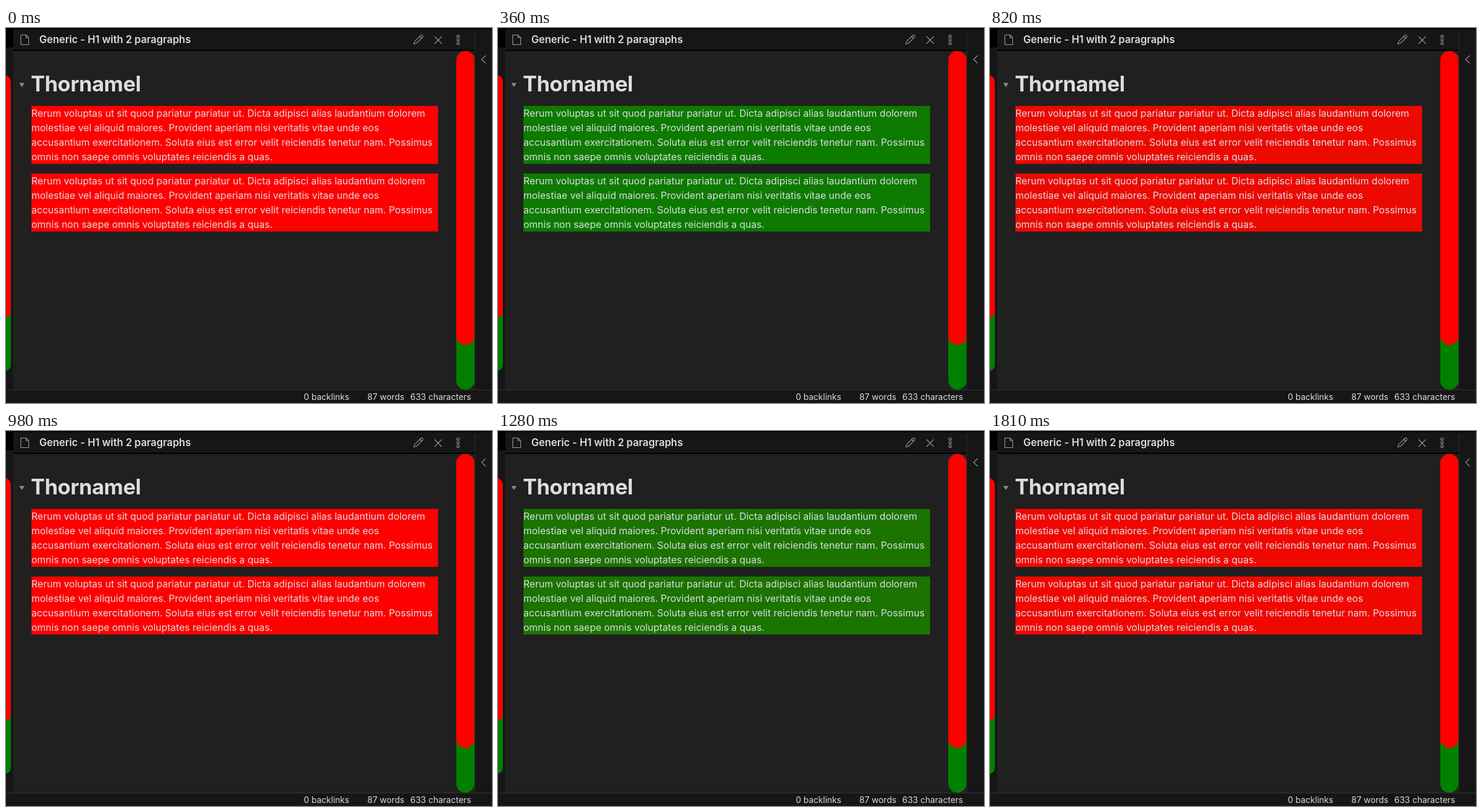
Animation of 803x621 px, one loop 2030 ms. Source, as an HTML page:

```html
<!DOCTYPE html>
<html lang="en">
<head>
<meta charset="utf-8">
<style>
  html, body { margin: 0; width: 100%; height: 100%; overflow: hidden; background: #000; }
  svg { display: block; }
  text { font-family: Inter, sans-serif; font-optical-sizing: none; fill: #dcddde; }
  .body { font-size: 16px; }
  .status { font-size: 14px; fill: #999; }
  .icon { fill: none; stroke: #999; stroke-width: 1.1; }
</style>
</head>
<body>
<svg width="803" height="621" viewBox="0 0 803 621">
  <path d="M0 32H12V599H0Z" fill="#161616"/>
  <path d="M12 36V6a4 4 0 0 1 4-4H770a4 4 0 0 1 4 4V36Z" fill="#161616"/>
  <path d="M12 38H774V599H12Z" fill="#202020"/>
  <path d="M775 2H803V599H775Z" fill="#161616"/>
  <path d="M774 2H775V599H774Z" fill="#2a2a2a"/>
  <path d="M0 599H803V621H0Z" fill="#161616"/>
  <path d="M0 599H803V600H0Z" fill="#333"/>

  <path d="M0 440H8V558Q8 564 2 567H0Z" fill="#008000"/>
  <path d="M0 78Q8 81 8 90V468Q8 477 0 480Z" fill="#f00"/>
  <rect x="744" y="38" width="30" height="561" rx="15" fill="#008000"/>
  <rect x="744" y="38" width="30" height="487" rx="15" fill="#f00"/>

  <g class="icon">
    <path d="M24.5 11.5H33L37.5 16V27.5H24.5ZM33 11.5V16H37.5"/>
    <path d="M674 26.5L675.2 22.2L685.6 11.8Q687 11 688.2 12.2Q689.4 13.4 688.6 14.8L678.2 25.2ZM683.5 14L686.5 17"/>
    <path d="M708 14L720 26M720 14L708 26"/>
    <circle cx="747" cy="13.5" r="2"/>
    <circle cx="747" cy="19.5" r="2"/>
    <circle cx="747" cy="25.5" r="2"/>
    <path d="M792.5 45.5L786 52L792.5 58.5"/>
  </g>
  <path d="M22 91H30.5L26.2 98Z" fill="#888"/>

  <text x="55" y="25" font-size="16.8" font-weight="600">Generic - H1 with 2 paragraphs</text>
  <text x="41" y="105" font-size="35" font-weight="700" letter-spacing="-.4">Thornamel</text>

  <g id="paragraph">
    <path class="fill" d="M42 129H714V225H42Z"/>
    <g class="body">
      <text x="42" y="147">Rerum voluptas ut sit quod pariatur pariatur ut. Dicta adipisci alias laudantium dolorem</text>
      <text x="42" y="171">molestiae vel aliquid maiores. Provident aperiam nisi veritatis vitae unde eos</text>
      <text x="42" y="195">accusantium exercitationem. Soluta eius est error velit reiciendis tenetur nam. Possimus</text>
      <text x="42" y="219">omnis non saepe omnis voluptates reiciendis a quas.</text>
    </g>
  </g>
  <use href="#paragraph" y="112"/>

  <g class="status">
    <text x="492" y="616">0 backlinks</text>
    <text x="597" y="616">87 words</text>
    <text x="668" y="616">633 characters</text>
  </g>
</svg>
<script>
const LOOP = 2030;
const steps = [0, 70, 140, 220, 290, 360, 590, 670, 750, 820,
  980, 1070, 1140, 1210, 1280, 1360, 1590, 1670, 1740, 1810];
const fill = document.querySelector('.fill');

// cubic-bezier(.25, .1, .25, 1), solved for x by bisection
function ease(x) {
  const curve = (s, a, b) => 3 * (1 - s) ** 2 * s * a + 3 * (1 - s) * s * s * b + s ** 3;
  let low = 0, high = 1;
  for (let i = 0; i < 20; i++) {
    const mid = (low + high) / 2;
    if (curve(mid, .25, .25) < x) low = mid; else high = mid;
  }
  return curve(low, .1, 1);
}

// One pulse per second: red to green, then back, each half eased
function pulseColor(ms) {
  const phase = Math.max(0, ms * 1.0285 - 9) % 1000 / 500;
  const green = phase < 1 ? ease(phase) : 1 - ease(phase - 1);
  return `rgb(${Math.round(255 * (1 - green))},${Math.round(128 * green)},0)`;
}

function draw(now) {
  const time = now % LOOP;
  fill.style.fill = pulseColor(steps.findLast(step => step <= time));
  requestAnimationFrame(draw);
}
draw(0);
</script>
</body>
</html>
```
